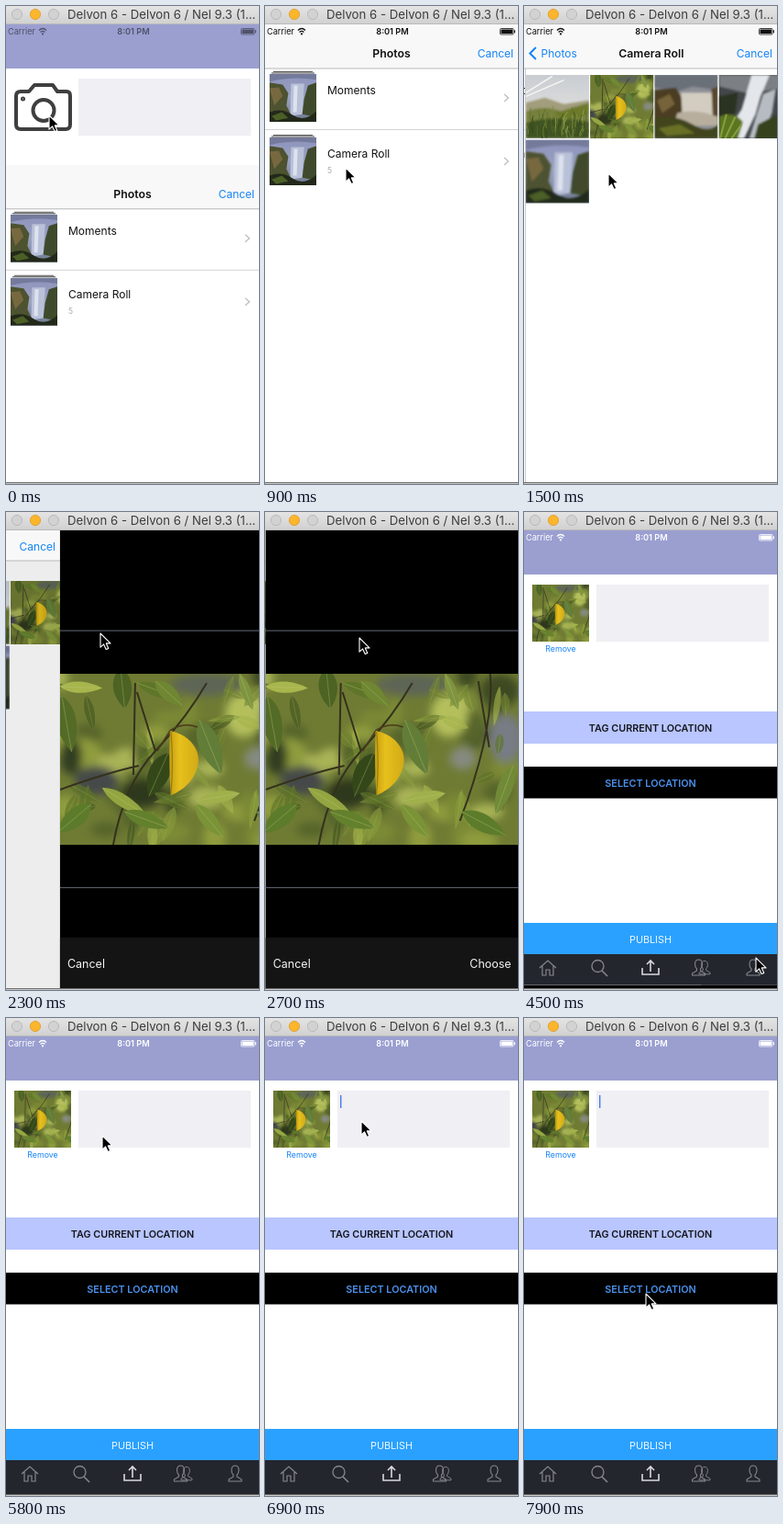
An HTML page for the animation above (8 s loop, 276 by 520 pixels).

```html
<!DOCTYPE html>
<html lang="en">
<head>
<meta charset="utf-8">
<title>Photo picker</title>
<style>
  html, body { margin: 0; width: 100%; height: 100%; overflow: hidden; background: #fff; }
  svg { display: block; }
  text { font-family: Inter, Roboto, "Liberation Sans", sans-serif; }
  .b { font-weight: 600; }
</style>
</head>
<body>
<svg id="stage" width="276" height="520" viewBox="0 0 276 520">
  <defs>
    <clipPath id="screen"><rect y="20" width="276" height="498"/></clipPath>
    <filter id="soft" x="-30%" y="-30%" width="160%" height="160%"><feGaussianBlur stdDeviation="5"/></filter>
    <filter id="haze"><feGaussianBlur stdDeviation="1.2"/></filter>
    <linearGradient id="bar" x2="0" y2="1"><stop stop-color="#e4e4e4"/><stop offset="1" stop-color="#d0d0d0"/></linearGradient>
    <linearGradient id="sky" x2="0" y2="1"><stop stop-color="#c9cdd2"/><stop offset="1" stop-color="#eceae4"/></linearGradient>
    <linearGradient id="dusk" x2="0" y2="1"><stop stop-color="#8d92bd"/><stop offset=".5" stop-color="#9aa3bf"/><stop offset="1" stop-color="#6d7990"/></linearGradient>
    <linearGradient id="gold"><stop stop-color="#c99d10"/><stop offset=".35" stop-color="#e6c01c"/><stop offset="1" stop-color="#d3aa16"/></linearGradient>

    <symbol id="leaves" viewBox="0 0 276 186" preserveAspectRatio="xMidYMid slice">
      <rect width="276" height="186" fill="#6f7b33"/>
      <g id="blobs" filter="url(#soft)"></g>
      <g id="foliage"></g>
    </symbol>

    <symbol id="meadow" viewBox="0 0 100 100">
      <rect width="100" height="100" fill="url(#sky)"/>
      <g filter="url(#haze)">
        <path d="M0 44 30 36 60 46 100 40V100H0Z" fill="#a29d7c"/>
        <path d="M0 58Q30 46 58 58T100 52V100H0Z" fill="#77803c"/>
        <path d="M0 76Q40 62 100 74V100H0Z" fill="#3f5320"/>
        <path d="M45 60 100 44V62L60 72Z" fill="#6c7a2b"/>
      </g>
      <path d="M0 28 42 2M0 34 60 8" stroke="#f7f7f5" stroke-width="2"/>
      <g id="grass" fill="none" stroke-width="1.6"></g>
    </symbol>

    <symbol id="cliff" viewBox="0 0 100 100">
      <rect width="100" height="100" fill="#8d8f95"/>
      <g filter="url(#haze)">
        <path d="M0 0H100V24L60 18 36 26 0 20Z" fill="#6b6f78"/>
        <path d="M0 24 34 20 46 42 40 76 0 84Z" fill="#4c3d22"/>
        <path d="M42 28H92L96 66H44Z" fill="#d3cdc1"/>
        <path d="M90 22 100 18V72L92 66Z" fill="#59472c"/>
        <path d="M36 60Q66 52 100 66V80H30Z" fill="#b8ae9d"/>
        <path d="M0 68Q34 62 60 78T100 78V100H0Z" fill="#3f441c"/>
        <path d="M6 84 40 78 64 92 20 96Z" fill="#697028"/>
        <path d="M4 40 24 30 32 46 12 60Z" fill="#77633a"/>
      </g>
    </symbol>

    <symbol id="stream" viewBox="0 0 100 100">
      <rect width="100" height="100" fill="#43474a"/>
      <g filter="url(#haze)">
        <path d="M0 0H100V20L50 30 0 18Z" fill="#7b8084"/>
        <path d="M52 0H80L66 34 58 62 40 100H6L36 54Z" fill="#e3e6ea"/>
        <path d="M70 30 90 22 84 60 66 100H48Z" fill="#b7bcc2"/>
        <path d="M0 34 30 28 26 60 0 78Z" fill="#2c3022"/>
        <path d="M0 66Q24 56 38 74L30 100H0Z" fill="#5b7424"/>
        <path d="M62 78 100 58V100H56Z" fill="#36421f"/>
      </g>
      <path d="M2 100 12 62M10 100 26 66M20 100 36 78" stroke="#84a03a" stroke-width="3"/>
    </symbol>

    <symbol id="falls" viewBox="0 0 100 100" preserveAspectRatio="none">
      <rect width="100" height="100" fill="url(#dusk)"/>
      <g filter="url(#haze)">
        <path d="M0 0H100V12Q50 4 0 16Z" fill="#747a9b"/>
        <path d="M46 20H74L70 84 44 88Z" fill="#b9c1d8"/>
        <path d="M52 24H60L58 80H50Z" fill="#dde2ee"/>
        <path d="M0 18 28 22 40 40 36 66 46 86 0 92Z" fill="#4d5230"/>
        <path d="M0 30 20 28 28 46 10 66Z" fill="#77683f"/>
        <path d="M100 18 82 24 74 52 70 84 100 90Z" fill="#3f4a2c"/>
        <path d="M0 80Q26 70 50 86T100 78V100H0Z" fill="#23291a"/>
        <path d="M4 88 26 80 40 92 14 97Z" fill="#4c5f26"/>
      </g>
    </symbol>
  </defs>

  <rect width="276" height="520" fill="#fff"/>
  <g clip-path="url(#screen)">
    <g id="home"></g>
    <g id="picker">
      <rect y="20" width="276" height="500" fill="#fff"/>
      <g id="list"></g>
      <g id="grid"></g>
      <rect id="dim" y="20" width="276" height="500"/>
      <g id="nav">
        <rect id="navBack" y="20" width="276" fill="#f8f8f8"/>
        <rect id="navLine" width="276" height="1" fill="#b9b9bc"/>
        <g id="navText"></g>
      </g>
      <g id="preview"></g>
    </g>
    <g id="status"></g>
  </g>
  <g id="windowBar"></g>
  <path id="cursor" d="M0 0V15.2L3.6 11.9 6.2 17.6 8.8 16.4 6.3 10.9H11Z" fill="#000" stroke="#fff" stroke-width="1.1" stroke-linejoin="round"/>
</svg>

<script>
const $ = id => document.getElementById(id);
const put = (id, ...parts) => { $(id).innerHTML = parts.join(''); };
const rect = (x, y, w, h, fill, more = '') => `<rect x="${x}" y="${y}" width="${w}" height="${h}" fill="${fill}" ${more}/>`;
const text = (x, y, size, fill, str, anchor = 'start', more = '') =>
  `<text x="${x}" y="${y}" font-size="${size}" fill="${fill}" text-anchor="${anchor}" ${more}>${str}</text>`;
const line = (d, color, width = 1, more = '') =>
  `<path d="${d}" fill="none" stroke="${color}" stroke-width="${width}" ${more}/>`;
const pic = (id, x, y, w, h = w) => `<use href="#${id}" x="${x}" y="${y}" width="${w}" height="${h}"/>`;
const BLUE = '#1584f7', BOLD = 'class="b"';

let seed = 11;
const rnd = (a = 0, b = 1) => {
  seed = (seed * 16807) % 2147483647;
  return a + (b - a) * seed / 2147483647;
};
const pick = list => list[Math.floor(rnd(0, list.length))];
const repeat = (n, make) => Array.from({ length: n }, (_, i) => make(i)).join('');

// A pointed leaf hanging from (x, y); angle 0 points down.
const leaf = (x, y, len, wide, angle, fill, opacity = 1) =>
  `<g transform="translate(${x} ${y}) rotate(${angle})" opacity="${opacity}">` +
  `<path d="M0 0C${wide} ${len * .25} ${wide * .8} ${len * .7} 0 ${len}C${-wide * .8} ${len * .7} ${-wide} ${len * .25} 0 0" fill="${fill}"/>` +
  line(`M0 0V${len}`, '#c3cc7a', .6, 'opacity=".5"') + '</g>';

function drawPhotos() {
  const blob = (x, y, rx, ry, fill) => `<ellipse cx="${x}" cy="${y}" rx="${rx}" ry="${ry}" fill="${fill}"/>`;
  put('blobs',
    repeat(46, () => blob(rnd(0, 276), rnd(0, 186), rnd(8, 22), rnd(7, 18), pick(['#8f9c3e', '#a9b457', '#57652a', '#3d4a22', '#7c8a36']))),
    blob(40, 116, 24, 16, '#45484a'), blob(262, 70, 18, 26, '#777c85'), blob(215, 92, 14, 12, '#858a80'),
    blob(160, 12, 40, 12, '#5d6557'), blob(90, 130, 24, 16, '#2d371c'), blob(200, 45, 20, 24, '#b4bf5c'), blob(12, 90, 12, 20, '#333d22'));
  put('foliage',
    repeat(34, () => leaf(rnd(0, 276), rnd(0, 165), rnd(22, 44), rnd(5, 10), rnd(-85, 85), pick(['#5d7327', '#879a3a', '#a5b44b', '#42561f', '#728531']), .62)),
    line('M58 186Q70 120 104 84T160 10M104 84 84 20M82 10 80 110M245 0Q250 60 212 160M232 8 244 80M0 126Q50 108 86 100', '#35311d', 2),
    leaf(2, 24, 62, 16, -10, '#536b27'), leaf(66, -6, 44, 15, -6, '#4c6324'), leaf(84, 10, 52, 10, -70, '#5e7629'),
    leaf(104, 8, 40, 12, -48, '#6f8632'), leaf(0, 14, 46, 9, -88, '#a7b64d'), leaf(152, 50, 64, 17, -22, '#627d38'),
    leaf(196, 0, 42, 8, -20, '#7f9440'), leaf(118, 86, 52, 17, 24, '#344719'), leaf(34, 142, 48, 15, 50, '#5d7c2b'),
    leaf(46, 124, 58, 10, -58, '#93a541'), leaf(70, 150, 52, 12, -70, '#63802d'), leaf(148, 142, 46, 12, -40, '#7b9337'),
    leaf(214, 150, 54, 14, -62, '#5c7c2c'), leaf(270, 100, 56, 12, 20, '#708a38'), leaf(196, 130, 48, 9, 80, '#a0b04b'),
    line('M150 58Q134 52 120 62L106 84', '#4a3b1b', 1.6),
    '<path d="M120 62C137 65 151 78 151 94C150 112 137 126 121 132C119 108 119 84 120 62Z" fill="url(#gold)"/>',
    line('M121 63Q124 98 121 131', '#8c8015', 1.2));
  put('grass', repeat(60, () => {
    const x = rnd(0, 100), y = rnd(70, 104), h = rnd(8, 24);
    return line(`M${x} ${y}q${rnd(-3, 3)} ${-h / 2} ${rnd(-5, 7)} ${-h}`, pick(['#7d9436', '#56702a', '#a2ab55', '#33461a']));
  }));
}

function drawHome() {
  const person = (x, s = 1) => `<g transform="translate(${x} 496) scale(${s})">` +
    line('M-2 1Q-4-1-4-4Q-4-9 0-9T4-4Q4-1 2 1V3L7 6V8H-7V6L-2 3Z', '#85878d', 1.1) + '</g>';
  put('home',
    rect(0, 20, 276, 500, '#fff'), rect(0, 20, 276, 48, '#9a9fd0'),
    rect(79, 79, 188, 62, '#efeff4'),
    '<g id="camera" fill="none" stroke="#3f3f3f" stroke-width="4" stroke-linejoin="round">',
    '<path d="M16 93H25L31 86H51L56 93H66Q70 93 70 98V129Q70 134 65 134H16Q11 134 11 129V98Q11 93 16 93Z"/>',
    '<circle cx="41" cy="113.500" r="11.500"/><circle cx="18.500" cy="101" r="1.500" stroke-width="2"/></g>',
    '<g id="chosen">', pic('leaves', 9, 79, 62), text(40, 152, 8.8, BLUE, 'Remove', 'middle'), '</g>',
    rect(82, 84, 1.4, 14, '#4b79e8', 'id="caret"'),
    rect(0, 217, 276, 35, '#b9c6ff'), text(138, 238.5, 10.8, '#15171f', 'TAG CURRENT LOCATION', 'middle', BOLD),
    rect(0, 277, 276, 34.5, '#000'), text(138, 298.5, 10.8, '#4b92ee', 'SELECT LOCATION', 'middle', BOLD),
    rect(0, 447, 276, 34, '#2aa1ff'), text(138, 468.5, 10.8, '#eef7ff', 'PUBLISH', 'middle'),
    rect(0, 481, 276, 39, '#24262e'),
    line('M17 496 26 488 35 496M20 494V504H24V498H28V504H32V494', '#85878d', 1.2),
    '<circle cx="80.500" cy="494" r="6.500" fill="none" stroke="#85878d" stroke-width="1.300"/>', line('M85 499 91 505', '#85878d', 1.6),
    line('M129 496V503H147V496M138 500V488M134 492 138 488 142 492', '#d9dade', 1.6),
    person(197, .85), person(190.5), person(250));
}

function drawPicker() {
  const row = (y, name, count) =>
    rect(9, y + 5, 43, 1, '#555') + rect(7, y + 6.5, 47, 1, '#444') +
    pic('falls', 5, y + 8, 51, 52) + text(68, y + 30, 12, '#111', name) + text(68, y + 47, 8.5, '#aaa', count) +
    line(`M261 ${y + 30}l4.500 4-4.500 4`, '#bdbdc2', 1.3);
  put('list', row(66, 'Moments', ''), rect(0, 134, 276, 1, '#d3d3d6'), row(135, 'Camera Roll', '5'));

  put('grid', rect(0, 20, 276, 500, '#fff'), rect(-1, 68, 1, 450, '#ccc'),
    ['meadow', 'leaves', 'cliff', 'stream', 'falls'].map((id, i) =>
      pic(id, i % 4 * 70.2, 75 + Math.floor(i / 4) * 70.5, 69)).join(''));

  put('navText',
    text(138, 56, 12.3, '#111', 'Photos', 'middle', 'class="b" id="listTitle"'),
    text(138, 56, 12.3, '#111', 'Camera Roll', 'middle', 'class="b" id="gridTitle"'),
    '<g id="back">', line('M12.500 45 6 51.500 12.500 58', BLUE, 2), text(18, 56, 12, BLUE, 'Photos'), '</g>',
    text(271, 56, 12, BLUE, 'Cancel', 'end'));

  put('preview', rect(0, 20, 276, 500, '#000'), pic('leaves', 0, 176, 276, 186),
    rect(0, 0, 276, 1.2, '#555965', 'id="cropTop"'), rect(0, 0, 276, 1.2, '#555965', 'id="cropBottom"'),
    rect(0, 463, 276, 57, '#141414'), text(8, 495.5, 12.5, '#f4f4f4', 'Cancel'), text(268, 495.5, 12.5, '#f4f4f4', 'Choose', 'end'));
}

function drawChrome() {
  put('status',
    text(2, 31, 9.2, 'currentColor', 'Carrier'),
    line('M36 26.500Q40 22.500 44 26.500M37.600 28.500Q40 26.200 42.400 28.500', 'currentColor', 1.3),
    '<circle cx="40" cy="30.400" r="1.100" fill="currentColor"/>',
    text(139, 31, 9.2, 'currentColor', '8:01 PM', 'middle', BOLD),
    rect(256.5, 24.5, 14.5, 6.5, 'none', 'rx="1" stroke="currentColor" stroke-width=".8"'),
    rect(257.5, 25.5, 12.5, 4.5, 'currentColor', 'id="charge"'), rect(271.7, 26.3, 1.2, 3, 'currentColor'));
  const light = (x, fill, edge) => `<circle cx="${x}" cy="9" r="5.600" fill="${fill}" stroke="${edge}" stroke-width=".800"/>`;
  put('windowBar',
    rect(0, 0, 276, 20, 'url(#bar)'), rect(0, 19.2, 276, .8, '#b4b4b4'),
    light(12, '#d2d2d2', '#b3b3b3'), light(32, '#fdb62c', '#dd9a26'), light(52, '#d2d2d2', '#b3b3b3'),
    text(67, 14, 13.2, '#3c3c3c', 'Delvon 6 - Delvon 6 / Nel 9.3 (1...'),
    rect(0, 518, 276, 1.3, '#6e6e6e'), rect(0, 519.3, 276, .7, '#c4c4c4'));
}

const LOOP = 8000, WIDTH = 276, HEIGHT = 500;
const PUSH_GRID = 975, PUSH_PREVIEW = 2083, DISMISS = 4010;
const PATH = [
  [0, 47, 119], [500, 47, 119], [900, 88, 176], [1500, 92, 182], [1950, 103, 124], [2300, 103, 132], [2700, 103, 137],
  [3000, 103, 137], [3600, 252, 482], [4000, 253, 485], [4650, 253, 485], [5400, 106, 130],
  [5800, 105, 128], [6200, 105, 110], [6900, 105, 112], [7700, 133, 300], [LOOP, 133, 300]
];

const clamp = v => Math.max(0, Math.min(1, v));
const ease = v => v * v * (3 - 2 * v);
const move = (id, x, y = 0) => $(id).setAttribute('transform', `translate(${x.toFixed(2)} ${y.toFixed(2)})`);
const set = (id, name, value) => $(id).setAttribute(name, value);
const show = (id, on) => set(id, 'display', on ? 'inline' : 'none');

// Share of the way still to go in a critically damped slide.
function remaining(t, start) {
  const x = Math.max(0, t - start) / 75;
  const r = (1 + x) * Math.exp(-x);
  return r < .002 ? 0 : r;
}

function cursorAt(t) {
  const i = PATH.findIndex(k => k[0] > t);
  const [t0, x0, y0] = PATH[i - 1], [t1, x1, y1] = PATH[i];
  const p = ease((t - t0) / (t1 - t0));
  return [x0 + (x1 - x0) * p, y0 + (y1 - y0) * p];
}

function render(t) {
  const gridLeft = remaining(t, PUSH_GRID), previewLeft = remaining(t, PUSH_PREVIEW);
  const gridIn = 1 - gridLeft, previewIn = 1 - previewLeft;
  const leaving = t > DISMISS, full = t >= PUSH_PREVIEW;

  move('picker', 0, leaving ? HEIGHT * (1 - remaining(t, DISMISS)) : HEIGHT * remaining(t, -180));
  show('picker', t < 4700);
  move('list', -.3 * WIDTH * gridIn);
  move('grid', WIDTH * gridLeft - .3 * WIDTH * previewIn);
  show('grid', t > PUSH_GRID);
  set('dim', 'opacity', .09 * previewIn);

  const navHeight = full ? 33 : 48;
  move('nav', -WIDTH * previewIn);
  set('navBack', 'width', WIDTH);
  set('navBack', 'height', navHeight);
  set('navLine', 'y', 19.5 + navHeight);
  move('navText', 0, full ? -14.5 : 0);
  move('listTitle', -100 * gridIn);
  set('listTitle', 'opacity', clamp(1 - 1.6 * gridIn));
  move('gridTitle', 110 * gridLeft);
  set('gridTitle', 'opacity', gridIn);
  move('back', 70 * gridLeft);
  set('back', 'opacity', gridIn);

  move('preview', WIDTH * previewLeft);
  show('preview', full);
  const grow = clamp((t - 3850) / 100);
  set('cropTop', 'y', 128.5 - 1.5 * grow);
  set('cropBottom', 'y', 408 + 5 * grow);

  show('status', !full || t >= 3900);
  set('status', 'color', t < 100 ? '#50516a' : !full ? '#111' : t < 4100 ? '#383838' : '#fff');
  show('charge', t < 3900 || t >= 4100);
  show('camera', t < DISMISS);
  show('chosen', t >= DISMISS);
  show('caret', t >= 6300 && (t - 6300) % 1000 < 650);
  move('cursor', ...cursorAt(t));
}

drawPhotos();
drawHome();
drawPicker();
drawChrome();
const begin = performance.now();
function tick() {
  render((performance.now() - begin) % LOOP);
  requestAnimationFrame(tick);
}
tick();
</script>
</body>
</html>
```
